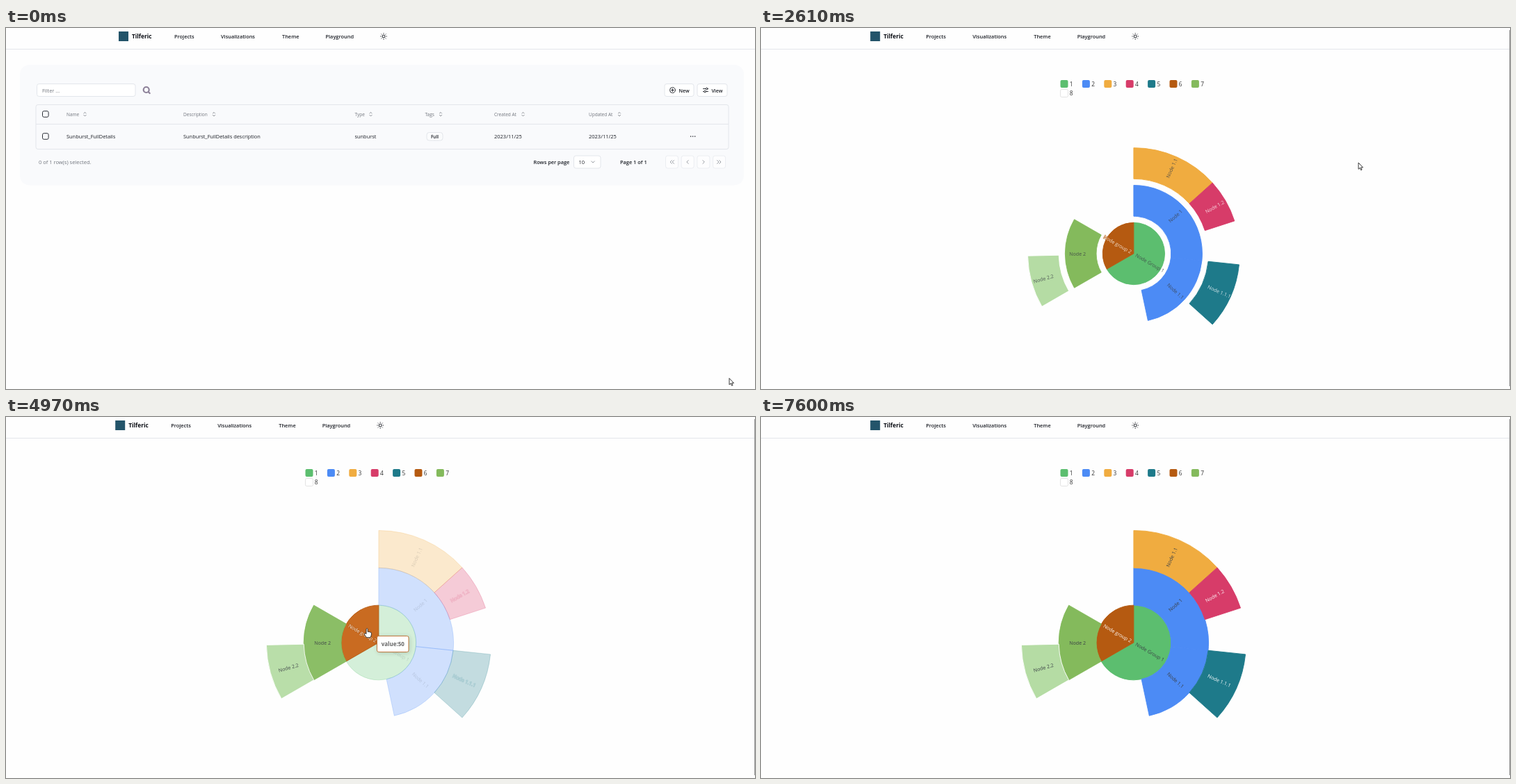
Recreate the animation shown at these times as an HTML page with a canvas. Size 1077 px wide and 520 px high, loop 8 s.

```html
<!DOCTYPE html>
<html lang="en">
<head>
<meta charset="utf-8">
<title>Sunburst</title>
<style>
html, body { margin: 0; height: 100%; overflow: hidden; background: #fefefe; }
canvas { display: block; width: 1077px; height: 520px; }
</style>
</head>
<body>
<canvas id="stage" width="1077" height="520"></canvas>
<script>
const ctx = document.getElementById('stage').getContext('2d');
const LOOP = 8000, TAU = Math.PI * 2;
const CENTER = { x: 535.9, y: 325 }, RING = 53.85;
const INK = '#1c1f26', GRAY = '#71757d', LINE = '#e3e6eb';
const PAGE_SWITCH = 1870, CHART_START = 1960, MENU_OPEN = 1000, MENU_CLOSE = 1590;
const LEAVE = 6435;

const palette = ['#5cbe6f', '#4c8bf5', '#f0ac40', '#d73c69', '#1e7a8a', '#b55a11', '#84ba5c', '#ffffff'];

// Angles in degrees, clockwise from the top
const node = (name, from, to, ring, color, parent, extra) =>
  ({ name, from, to, ring, color, stroke: color, parent, ...extra });
const light = { light: true };
const nodes = [
  node('Node Group 1', 0, 240, 0, palette[0], -1),
  node('Node 1', 0, 96, 1, palette[1], 0),
  node('Node 1.1', 0, 48, 2, palette[2], 1),
  node('Node 1.2', 48, 72, 2, palette[3], 1, light),
  node('Node 1.1', 96, 168, 1, palette[1], 0),
  node('Node 1.1.1', 96, 132, 2, palette[4], 4, light),
  node('Node group 2', 240, 360, 0, palette[5], -1, light),
  node('Node 2', 240, 300, 1, palette[6], 6),
  node('Node 2.2', 240, 268.8, 2, '#b5dca4', 7, { stroke: '#ffffff' }),
];

// [time, hovered node]
const hovers = [[3146, 2], [3798, 1], [3864, 0], [4800, 6], [5480, 7], [5915, 8], [LEAVE, -1]];

// [time, x, y] of the pointer tip
const pointerPath = [
  [0, 1040, 504.5], [70, 1040, 504.5], [250, 1032, 440], [550, 1005, 260], [850, 985, 153],
  [1010, 985, 153], [1330, 939, 181], [2290, 939, 181], [2400, 925, 184], [2800, 800, 203],
  [3060, 695, 209], [3150, 642, 213], [3230, 621, 219], [3600, 608, 222], [3780, 585, 225],
  [3800, 575, 235], [3850, 562, 269], [3930, 541, 297], [4000, 540, 300], [4690, 540, 300],
  [4800, 533, 301], [4890, 520, 304], [5250, 516, 306], [5460, 489, 312], [5490, 481, 315],
  [5900, 432, 344], [5950, 413, 352], [6030, 405, 358], [6150, 404, 360], [6340, 404, 360],
  [6450, 432, 398], [6560, 540, 450], [6800, 800, 430], [6980, 1010, 310], [7110, 990, 262],
  [7200, 990, 300], [7400, 1035, 420], [7530, 1050, 505], [7590, 1052, 535],
];

const clamp = v => Math.min(1, Math.max(0, v));
const mix = (a, b, k) => a + (b - a) * k;
const cubicOut = k => 1 - (1 - clamp(k)) ** 3;
const cubicInOut = k => (k = clamp(k)) < .5 ? 4 * k ** 3 : 1 - 4 * (1 - k) ** 3;

function pointerAt(t) {
  const i = pointerPath.findIndex(p => p[0] > t);
  if (i < 0) return pointerPath.at(-1).slice(1);
  const [t0, x0, y0] = pointerPath[i - 1], [t1, x1, y1] = pointerPath[i];
  const k = (t - t0) / (t1 - t0);
  return [mix(x0, x1, k), mix(y0, y1, k)];
}

function isWithin(i, ancestor) {
  while (i >= 0 && i !== ancestor) i = nodes[i].parent;
  return i === ancestor;
}

// Replays the hover changes; each one eases on from the value reached so far
function stateOf(i, t) {
  const s = { fill: 1, label: 1, lift: 0 };
  hovers.forEach(([start, target], n) => {
    if (t < start) return;
    const end = n + 1 < hovers.length ? Math.min(t, hovers[n + 1][0]) : t;
    const k = cubicOut((end - start) / 300);
    const clear = target < 0 || isWithin(i, target);
    s.fill = mix(s.fill, clear ? 1 : .2, k);
    s.label = mix(s.label, clear ? 1 : .1, k);
    s.lift = mix(s.lift, i === target ? .1 : 0, k);
  });
  return s;
}

function lighten(hex, amount) {
  const part = p => Math.min(255, parseInt(hex.slice(p, p + 2), 16) * (1 + amount));
  return `rgb(${part(1)}, ${part(3)}, ${part(5)})`;
}

function text(str, x, y, { size = 7.4, weight = 400, color = INK, align = 'left' } = {}) {
  ctx.font = `${weight} ${size}px "Open Sans", "Noto Sans", sans-serif`;
  ctx.textAlign = align;
  ctx.fillStyle = color;
  ctx.fillText(str, x, y + size * .36);
}

function box(x, y, w, h, r, fill, stroke, width = 1) {
  ctx.beginPath();
  ctx.roundRect(x, y, w, h, r);
  if (fill) { ctx.fillStyle = fill; ctx.fill(); }
  if (stroke) { ctx.strokeStyle = stroke; ctx.lineWidth = width; ctx.stroke(); }
}

function icon(path, x, y, color = INK, width = .9) {
  ctx.save();
  ctx.translate(x, y);
  ctx.strokeStyle = color;
  ctx.lineWidth = width;
  ctx.lineCap = ctx.lineJoin = 'round';
  ctx.stroke(new Path2D(path));
  ctx.restore();
}

function shadowed(draw, alpha = .2, blur = 6) {
  ctx.save();
  ctx.shadowColor = `rgba(0,0,0,${alpha})`;
  ctx.shadowBlur = blur;
  ctx.shadowOffsetX = ctx.shadowOffsetY = 1;
  draw();
  ctx.restore();
}

function drawHeader(dx) {
  ctx.fillStyle = LINE;
  ctx.fillRect(0, 30, 1077, 1);
  ctx.save();
  ctx.translate(dx, 0);
  box(162, 5, 14, 14, 0, '#23546a');
  text('Tilferic', 181, 12, { size: 8.3, weight: 700, color: '#0c0f16' });
  [['Projects', 242], ['Visualizations', 309], ['Theme', 397], ['Playground', 459.5]]
    .forEach(([label, x]) => text(label, x, 12, { weight: 600 }));
  ctx.strokeStyle = INK;
  ctx.lineWidth = 1;
  ctx.beginPath();
  ctx.arc(543, 12, 2, 0, TAU);
  for (let i = 0; i < 8; i++) {
    const c = Math.cos(i * TAU / 8), s = Math.sin(i * TAU / 8);
    ctx.moveTo(543 + c * 3.6, 12 + s * 3.6);
    ctx.lineTo(543 + c * 4.8, 12 + s * 4.8);
  }
  ctx.stroke();
  ctx.restore();
}

function drawTable(t) {
  box(20, 53, 1041, 173.5, 14, '#f9fafc');
  box(44.5, 80.5, 141.5, 18, 3, '#fff', LINE);
  text('Filter ...', 52, 90, { color: GRAY });
  icon('M4 0A4 4 0 1 1 -4 0A4 4 0 1 1 4 0M3 3L5 5', 201.7, 89, '#8d8199', 2.2);

  box(947, 80.5, 42, 18, 3, '#fff', LINE);
  icon('M4 0A4 4 0 1 1 -4 0A4 4 0 1 1 4 0M-2 0H2M0 -2V2', 958.5, 89.5);
  text('New', 967.5, 90, { weight: 600, size: 7 });
  box(994, 80.5, 43, 18, 3, '#fff', LINE);
  icon('M-3.5 -2H0M3 -2H3.5M-3.5 2H-2.5M.5 2H3.5M3 -2A1.4 1.4 0 1 1 .2 -2A1.4 1.4 0 1 1 3 -2M.5 2A1.4 1.4 0 1 1 -2.3 2A1.4 1.4 0 1 1 .5 2', 1006, 89.5);
  text('View', 1014.5, 90, { weight: 600, size: 7 });

  box(43, 110.5, 996, 64, 3, null, LINE);
  if (t > 800) { ctx.fillStyle = '#f4f6f9'; ctx.fillRect(43.5, 138.5, 995, 35.5); }
  ctx.fillStyle = LINE;
  ctx.fillRect(43, 138, 996, 1);
  [['Name', 87, 113.5], ['Description', 255, 299], ['Type', 501.5, 524.5],
   ['Tags', 602.5, 625], ['Created At', 702, 743.5], ['Updated At', 838, 882]]
    .forEach(([label, x, sortX]) => {
      text(label, x, 124.5, { size: 6.5, weight: 500, color: GRAY });
      icon('M-1.6 -1.2L0 -2.8L1.6 -1.2M-1.6 1.2L0 2.8L1.6 1.2', sortX, 124.2, GRAY, .8);
    });
  [124, 156].forEach(y => box(52.5, y - 4.3, 8.6, 8.6, 2, null, '#2b2e35'));
  text('Sunburst_FullDetails', 87, 156.3);
  text('Sunburst_FullDetails description', 255, 156.3);
  text('sunburst', 501.5, 156.3);
  box(605, 150.5, 23, 11.5, 3.5, '#fbfcfd', LINE);
  text('Full', 616.5, 156.5, { size: 6.5, weight: 600, align: 'center' });
  text('2023/11/25', 702, 156.3, { size: 7.5 });
  text('2023/11/25', 838, 156.3, { size: 7.5 });
  if (t > 820) box(979, 148, 17, 17, 3, '#eef1f5');
  ctx.fillStyle = INK;
  [-3, 0, 3].forEach(d => ctx.fillRect(987 + d, 155.5, 1.3, 1.3));

  text('0 of 1 row(s) selected.', 47, 193, { size: 7.5, color: GRAY });
  text('Rows per page', 758.5, 193, { weight: 600 });
  box(816.5, 184, 38.5, 18, 3, '#fff', LINE);
  text('10', 823.5, 193, { size: 7.5 });
  icon('M-2.2 -1.1L0 1.1L2.2 -1.1', 844, 193, '#8a8e95');
  text('Page 1 of 1', 883, 193, { weight: 600 });
  ['M0 -2.4L-2.4 0L0 2.4M3 -2.4L.6 0L3 2.4', 'M1 -2.4L-1.4 0L1 2.4',
   'M-1 -2.4L1.4 0L-1 2.4', 'M0 -2.4L2.4 0L0 2.4M-3 -2.4L-.6 0L-3 2.4']
    .forEach((path, i) => {
      const x = 948.5 + i * 22.7;
      box(x, 184, 18, 18, 3, '#fdfdfe', '#eceef2');
      icon(path, x + 9, 193, '#8f939a');
    });
}

function drawMenu(t) {
  const alpha = clamp((t - MENU_OPEN) / 100) * clamp(1 - (t - MENU_CLOSE) / 100);
  if (!alpha) return;
  ctx.save();
  ctx.globalAlpha = alpha;
  shadowed(() => box(908.5, 166, 89, 47.5, 3, '#fff'), .1, 4);
  box(908.5, 166, 89, 47.5, 3, null, LINE);
  if (t > 1200) box(911, 168.5, 84, 18.5, 2, '#f1f4f8');
  text('View', 916.5, 178);
  ctx.fillStyle = LINE;
  ctx.fillRect(909, 189.5, 88, 1);
  text('Delete', 916.5, 202);
  ctx.restore();
}

function drawLegend() {
  palette.forEach((color, i) => {
    const x = 430.5 + (i % 7) * 31.4, y = i < 7 ? 80.5 : 94;
    box(x, y - 5.5, 11, 11, 2, color, i === 7 ? '#dcdcdc' : null, .8);
    text(String(i + 1), x + 13.3, y + .3, { size: 8.4, color: '#333' });
  });
}

function drawChart(t) {
  const grown = cubicInOut((t - CHART_START) / 1000);
  const states = nodes.map((_, i) => stateOf(i, t));
  const rad = deg => (deg - 90) * Math.PI / 180;

  nodes.forEach((n, i) => {
    const inner = n.ring * RING, outer = inner + RING * grown;
    ctx.globalAlpha = states[i].fill;
    ctx.beginPath();
    ctx.arc(CENTER.x, CENTER.y, outer, rad(n.from), rad(n.to));
    ctx.arc(CENTER.x, CENTER.y, inner, rad(n.to), rad(n.from), true);
    ctx.closePath();
    ctx.fillStyle = lighten(n.color, states[i].lift);
    ctx.fill();
    ctx.strokeStyle = n.stroke;
    ctx.lineWidth = .9;
    ctx.stroke();
  });

  nodes.forEach((n, i) => {
    const mid = (n.from + n.to) / 2, r = (n.ring + .5) * RING;
    ctx.save();
    ctx.globalAlpha = states[i].label * grown;
    ctx.translate(CENTER.x + Math.cos(rad(mid)) * r, CENTER.y + Math.sin(rad(mid)) * r);
    ctx.rotate(rad(mid > 180 ? mid - 180 : mid));
    const size = 7.1;
    if (n.light) {
      ctx.font = `500 ${size}px "Open Sans", "Noto Sans", sans-serif`;
      ctx.textAlign = 'center';
      ctx.lineJoin = 'round';
      ctx.lineWidth = 1.2;
      ctx.strokeStyle = n.color;
      ctx.strokeText(n.name, 0, size * .36);
    }
    text(n.name, 0, 0, { size, weight: n.light ? 500 : 400, color: n.light ? '#fff' : '#3b4046', align: 'center' });
    ctx.restore();
  });
  ctx.globalAlpha = 1;
}

function hoveredAt(t) {
  const past = hovers.filter(h => h[0] <= t);
  return past.length ? past.at(-1)[1] : -1;
}

function drawTooltip(t) {
  const alpha = clamp(1 - (t - LEAVE - 100) / 200);
  const shown = Math.min(t, LEAVE - 1), n = nodes[hoveredAt(shown)];
  if (!n || !alpha) return;
  const [px, py] = pointerAt(shown - 80);
  const label = 'value:' + Math.round((n.to - n.from) / 2.4);
  const x = px + 13.5, y = py + 11.5, w = 45.5 + (label.length - 8) * 4.7;
  ctx.save();
  ctx.globalAlpha = alpha;
  shadowed(() => box(x, y, w, 23, 2.5, '#fff'));
  box(x, y, w, 23, 2.5, '#fff', n.stroke, .8);
  text(label, x + w / 2, y + 11.8, { size: 7.95, weight: 700, color: '#666', align: 'center' });
  ctx.restore();
}

const arrow = new Path2D('M0 0V9.3L2.1 7.4L3.6 10.7L5 10.1L3.6 6.9H6.5Z');
const hand = new Path2D('M-1.1 8V1Q0 -.8 1.1 1V5Q2 4.2 2.8 5.2Q3.8 4.5 4.5 5.6Q6 5.2 6.3 6.8V9.5L5 13.2H-.6L-3.7 9Q-4 7 -2.4 7.2Z');

function drawPointer(t) {
  const [x, y] = pointerAt(t), shape = hoveredAt(t) < 0 ? arrow : hand;
  ctx.save();
  ctx.translate(x, y);
  ctx.fillStyle = '#fff';
  ctx.strokeStyle = '#222';
  ctx.lineWidth = .9;
  ctx.lineJoin = 'round';
  ctx.fill(shape);
  ctx.stroke(shape);
  ctx.restore();
}

function draw(t) {
  ctx.fillStyle = '#fefefe';
  ctx.fillRect(0, 0, 1077, 520);
  if (t < PAGE_SWITCH) {
    drawHeader(0);
    drawTable(t);
    drawMenu(t);
  } else {
    drawHeader(-4.8);
    ctx.fillStyle = '#9a9a9a';
    ctx.fillRect(1076, 3, 1, 513);
    if (t >= CHART_START) {
      drawLegend();
      drawChart(t);
      drawTooltip(t);
    }
  }
  drawPointer(t);
}

const begin = performance.now();
function tick() {
  draw((performance.now() - begin) % LOOP);
  requestAnimationFrame(tick);
}
tick();
</script>
</body>
</html>
```
